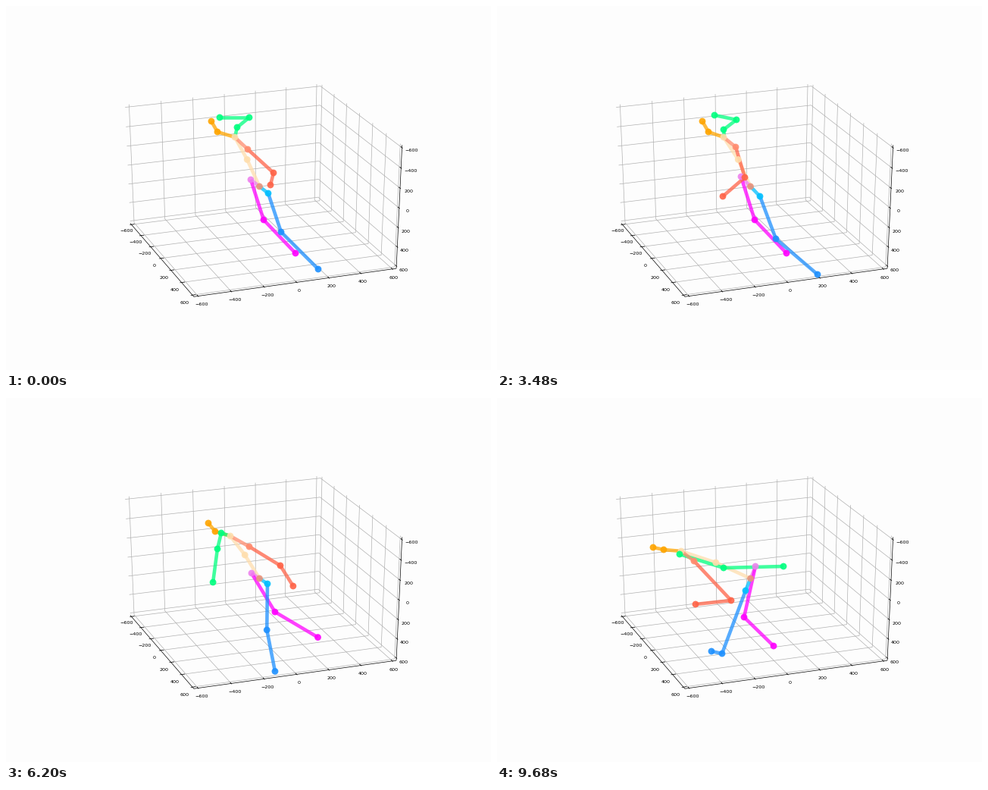
Write a matplotlib script that moves like this. It is 640x480 px and loops after 9.72 s.

```python
import numpy as np
import matplotlib.pyplot as plt
from matplotlib.animation import FuncAnimation
from matplotlib.collections import LineCollection

W, H, DPI = 640, 480, 100
FRAMES, STEP = 243, 40
BACK = "#fdfdfd"
ROOT = np.array([334.5, 238])

# joint order: root, right leg, left leg, spine, neck, jaw, head, left arm, right arm
L_KNEE, L_FOOT = 5, 6
NECK = 8
L_ARM, R_ARM = slice(11, 14), slice(14, 17)
PARENT = [None, 0, 1, 2, 0, 4, 5, 0, 7, 8, 9, 8, 11, 12, 8, 14, 15]
DRAW_ORDER = [*range(7, 11), *range(1, 7), *range(11, 17)]
COLORS = (["#e9937a", "violet"] + ["magenta"] * 2
          + ["deepskyblue"] + ["dodgerblue"] * 2
          + ["navajowhite"] * 2 + ["orange"] * 2
          + ["springgreen"] * 3 + ["#ff8c6e"] + ["tomato"] * 2)


def pose(hip, r_leg, l_leg, neck, face, l_arm, r_arm):
    """Left hip mirrors the right one; the spine arches between root and neck."""
    hip, neck = np.array(hip, float), np.array(neck, float)
    spine = (ROOT + neck) / 2 - (0, 3)
    return np.vstack([ROOT, hip, r_leg, 2 * ROOT - hip, l_leg,
                      spine, neck, face, l_arm, r_arm])


def mix(a, b, k):
    return a + (b - a) * k


def tweak(p, moves):
    p = p.copy()
    for joint, xy in moves:
        p[joint] = xy
    return p


def gait(hip, phase, reach):
    """Knee and foot swing on ellipses below the hip."""
    c, s = np.cos(phase), np.sin(phase)
    knee = reach * (15 + 16 * c - 11 * s), 56 - 5 * c
    foot = reach * (50 + 38 * c - 11 * s), 100 - 16 * c - 7 * s
    return hip + np.array([knee, foot])


def walk(phase):
    hip = np.array([324, 231])
    swing = 6 * (1 - np.cos(phase))
    return pose(hip, gait(hip, phase, 1),
                gait(2 * ROOT - hip, phase + np.pi, 0.8),
                (296, 182), [(276, 176), (267, 165)],
                [(284, 178), (279, 199), (273 + swing, 243)],
                [(321, 196), (362, 221), (379 - swing, 248)])


START = pose((323, 229), [(340, 282), (382, 326)], [(363, 298), (412, 347)],
             (302, 173), [(279, 166), (271, 152)],
             [(305, 160), (321, 147), (282, 147)],
             [(319, 189), (353, 220), (349, 236)])
LEAN = tweak(START, [
    (1, (322, 225)), (4, (347, 251)), (L_KNEE, (368, 307)), (L_FOOT, (423, 354)),
    (NECK, (299, 173)),
    (L_ARM, [(296, 159), (313, 146), (284, 140)]),
    (R_ARM, [(317, 188), (329, 228), (300, 253)])])
HOLD = tweak(LEAN, [(L_ARM, LEAN[L_ARM] + (3, 4)), (R_ARM, LEAN[R_ARM] - (2, 2))])
TURN = pose((307, 246), [(329, 304), (323, 347)], [(399, 295), (414, 328)],
            (316, 186), [(316, 185), (309, 175)],
            [(282, 198), (256, 239), (249, 288)],
            [(341, 185), (351, 209), (346, 234)])
STOOP = pose((320, 233), [(326, 296), (345, 334)], [(362, 301), (387, 338)],
             (291, 202), [(276, 200), (264, 188)],
             [(268, 199), (255, 219), (255, 265)],
             [(317, 208), (362, 230), (377, 261)])
LUNGE = pose((341, 222), [(326, 289), (365, 327)], [(297, 337), (283, 334)],
             (243, 202), [(220, 200), (206, 197)],
             [(241, 206), (299, 224), (378, 222)],
             [(260, 215), (309, 267), (262, 272)])

QUARTER = 287.5  # ms per quarter of a walking cycle
KEYS = [(0, START), (1040, LEAN), (3480, HOLD),
        (3960, mix(HOLD, walk(-1.5 * np.pi), 0.8))]
KEYS += [(5080 + q * QUARTER, walk(q * np.pi / 2)) for q in range(-3, 7)]
KEYS += [(7280, TURN),
         (7520, tweak(mix(TURN, STOOP, 0.15), [(L_FOOT, (430, 332))])),
         (8320, STOOP),
         (9000, mix(STOOP, LUNGE, 0.3)),
         (9680, LUNGE)]
TIMES = np.array([t for t, _ in KEYS], float)
POSES = np.array([p for _, p in KEYS])


def tangents():
    """Monotone slopes, flat wherever a joint reverses."""
    s = np.diff(POSES, axis=0) / np.diff(TIMES)[:, None, None]
    a, b = s[:-1], s[1:]
    same = a * b > 0
    inner = np.where(same, 2 * a * b / np.where(same, a + b, 1), 0)
    return np.concatenate([s[:1], inner, s[-1:]])


SLOPES = tangents()


def pose_at(t):
    i = min(np.searchsorted(TIMES, t, side="right") - 1, len(TIMES) - 2)
    h = TIMES[i + 1] - TIMES[i]
    u = (t - TIMES[i]) / h
    return ((1 + 2 * u) * (1 - u) ** 2 * POSES[i]
            + u * (1 - u) ** 2 * h * SLOPES[i]
            + u * u * (3 - 2 * u) * POSES[i + 1]
            + u * u * (u - 1) * h * SLOPES[i + 1])


ELEV, AZIM = np.radians([27, -20])
EDGE = 625  # the walls stand a little outside the outermost ticks


def project(x, y, z):
    """Camera view of a data point, z pointing down."""
    x, y, z = x / 1200, y / 1200, -0.859 * z / 1200
    right = y * np.cos(AZIM) - x * np.sin(AZIM)
    near = x * np.cos(AZIM) + y * np.sin(AZIM)
    up = z * np.cos(ELEV) - near * np.sin(ELEV)
    depth = 10 - near * np.cos(ELEV) - z * np.sin(ELEV)
    return 334.7 + 2681 * right / depth, 237.4 - 1998 * up / depth


VALUES = range(-600, 601, 200)
LABELS = [str(v).replace("-", "\u2212") for v in VALUES]

fig = plt.figure(figsize=(W / DPI, H / DPI), dpi=DPI, facecolor=BACK)
ax = fig.add_axes([0, 0, 1, 1])
ax.set_xlim(0, W)
ax.set_ylim(H, 0)
ax.axis("off")


def draw_box():
    e, inner, outer = EDGE, EDGE - 20, EDGE + 10
    grid, black = [], []
    for v in VALUES:
        grid += [[project(v, e, -e), project(v, e, e), project(v, -e, e)],
                 [project(-e, v, -e), project(-e, v, e), project(e, v, e)],
                 [project(-e, -e, v), project(-e, e, v), project(e, e, v)]]
        black += [[project(v, -inner, e), project(v, -outer, e)],
                  [project(inner, v, e), project(outer, v, e)],
                  [project(inner, e, v), project(outer, e, v)]]
    black += [[project(-e, -e, e), project(e, -e, e)],
              [project(e, -e, e), project(e, e, e)],
              [project(e, e, -e), project(e, e, e)]]
    ax.add_collection(LineCollection(grid, colors="#b0b0b0", linewidths=0.5))
    ax.add_collection(LineCollection(black, colors="black", linewidths=0.5))


def draw_labels(place, labels, first, last):
    """Label each tick, the offset going from first to last."""
    offsets = np.linspace(first, last, len(labels))
    for v, text, offset in zip(VALUES, labels, offsets):
        x, y = place(v) + offset
        ax.text(x, y, text, fontsize=4.6, family="DejaVu Sans",
                ha="center", va="center_baseline")


draw_box()
draw_labels(lambda v: project(v, -EDGE, EDGE), LABELS, (-6, 8), (-10, 10))
draw_labels(lambda v: project(EDGE, v, EDGE), LABELS, (5, 10), (2, 11))
draw_labels(lambda v: project(EDGE, EDGE, v),
            LABELS[:2] + ["200"] + LABELS[3:], (13, 3), (9, 5))

bones = LineCollection([], colors=[COLORS[j] for j in DRAW_ORDER],
                       linewidths=3.3, alpha=0.75, zorder=3)
ax.add_collection(bones)
dots = ax.scatter(*START.T, s=40, c=COLORS, linewidths=0, alpha=0.9, zorder=4)


def update(frame):
    p = pose_at(frame * STEP)
    bones.set_segments([[p[PARENT[j]], p[j]] for j in DRAW_ORDER])
    dots.set_offsets(p)
    return bones, dots


anim = FuncAnimation(fig, update, frames=FRAMES, interval=STEP,
                     repeat=True, repeat_delay=0)
plt.show()
```
